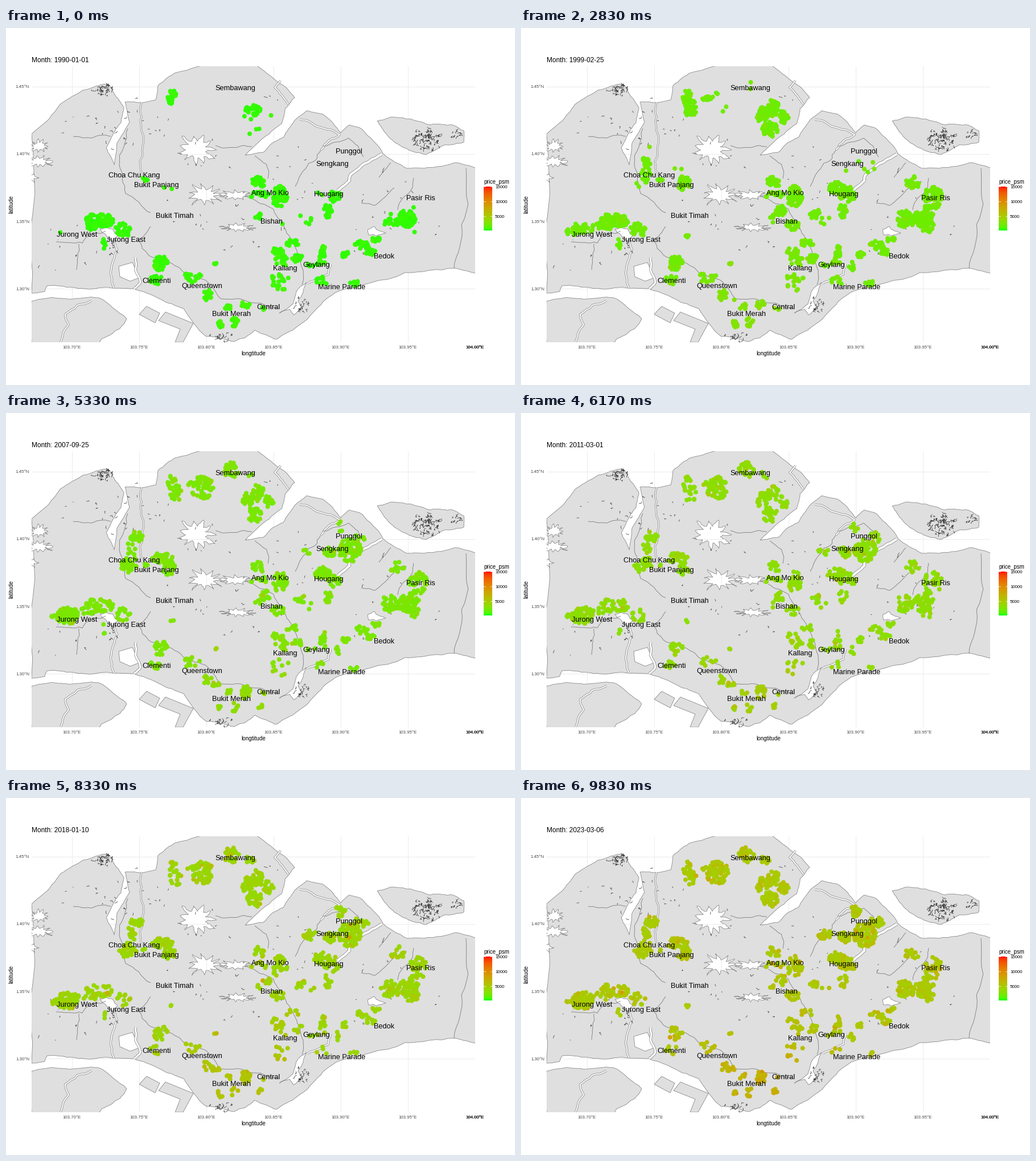
A matplotlib script that plays this animation: 894 by 626 pixels, repeating every 10 s.

```python
import numpy as np
import matplotlib.pyplot as plt
from matplotlib.animation import FuncAnimation
from matplotlib.collections import LineCollection
from matplotlib.patches import Polygon, Rectangle

W, H, DPI = 894, 626, 100
FRAMES, LOOP = 60, 10000
PX = 72 / DPI
LAND, COAST, GRID = "#dfdfdf", "#858585", "#ebebeb"
rng = np.random.default_rng(7)

plt.rcParams["font.family"] = "Liberation Sans"
fig = plt.figure(figsize=(W / DPI, H / DPI), dpi=DPI, facecolor="white")
ax = fig.add_axes([0, 0, 1, 1])
ax.axis("off")
panel = Rectangle((45, 67), 779, 484, fc="none", ec="none")
ax.add_patch(panel)

GRID_X = 116 + 118 * np.arange(7)
GRID_Y = 102.5 + 118.1 * np.arange(4)
GRID_LINES = [[(x, 67), (x, 551)] for x in GRID_X]
GRID_LINES += [[(45, y), (824, y)] for y in GRID_Y]


def rough(pts, amount, levels=3):
    """Split every edge at a midpoint pushed sideways, a few times over."""
    p = np.array(pts, float)
    for _ in range(levels):
        d = np.diff(p, axis=0)
        push = rng.normal(0, amount, (len(d), 1)) * np.c_[-d[:, 1], d[:, 0]]
        q = np.empty((2 * len(p) - 1, 2))
        q[::2], q[1::2] = p, p[:-1] + d / 2 + push
        p = q
    return p


def lines(segs, color, px, clip=panel):
    lc = LineCollection(segs, colors=color, linewidths=px * PX, zorder=1)
    ax.add_collection(lc, autolim=False)
    lc.set_clip_path(clip)


def area(pts, fill=LAND, amount=0.0):
    pts = rough(list(pts) + [pts[0]], amount)
    patch = Polygon(pts, fc=fill, ec=COAST, lw=0.8 * PX, zorder=1)
    ax.add_patch(patch)
    patch.set_clip_path(panel)
    if fill == "white":
        lines(GRID_LINES, GRID, 1, patch)


def lake(x, y, rx, ry, arms=11):
    """A reservoir with many narrow arms."""
    a = np.linspace(0, 2 * np.pi, 2 * arms, endpoint=False)
    a += rng.uniform(-0.1, 0.1, len(a))
    r = np.where(np.arange(len(a)) % 2, 0.5, 1) * rng.uniform(0.8, 1.1, len(a))
    area(np.c_[x + rx * r * np.cos(a), y + ry * r * np.sin(a)], "white", 0.08)


def canal(width, *pts):
    path = rough(pts, 0.05)
    lines([path], COAST, width + 1.5)
    lines([path], "white", width)


def stream(*pts):
    lines([rough(pts, 0.06)], "#777777", 0.8)


def scribble(x, y, rx, ry, n, steps=5):
    """Short random walks inside an ellipse, like tangled contour lines."""
    a, r = rng.uniform(0, 2 * np.pi, n), np.sqrt(rng.random(n))
    start = np.c_[x + rx * r * np.cos(a), y + ry * r * np.sin(a)]
    walk = np.cumsum(rng.normal(0, 1.7, (n, steps, 2)), axis=1)
    lines(start[:, None] + walk, "#333333", 0.7)


def label(x, y, s, px, ha="center", color="black"):
    return ax.text(x, y + 0.36 * px, s, fontsize=px * PX, ha=ha,
                   va="baseline", color=color, zorder=4)


# ---- map ----
lines(GRID_LINES, GRID, 1)

north_west = [
    (45, 186), (75, 160), (97, 132), (135, 109), (180, 98), (193, 120),
    (207, 140), (202, 166), (186, 190), (176, 210), (190, 240), (195, 202),
    (217, 165), (209, 130), (240, 131), (263, 126), (267, 101), (300, 78), (350, 66)]
north_east = [
    (425, 60), (478, 95), (507, 122), (490, 142), (484, 168), (448, 196),
    (420, 223), (452, 218), (487, 192), (507, 162), (528, 145), (556, 151),
    (588, 184), (603, 170), (626, 178), (662, 220)]
south_east = [
    (704, 246), (735, 246), (757, 243), (790, 236), (830, 247), (830, 431),
    (788, 421), (700, 429), (640, 447), (580, 463), (545, 493), (496, 533),
    (475, 546), (437, 530)]
south_west = [
    (420, 543), (400, 550), (352, 541), (312, 492), (270, 475), (225, 457),
    (180, 455), (146, 458), (118, 455), (72, 452), (68, 462), (45, 465)]
area(north_west + north_east + south_east + south_west, amount=0.035)

# islands and port terminals
area([(652, 163), (690, 157), (745, 170), (785, 170), (804, 180), (804, 200),
      (770, 205), (738, 222), (692, 206), (662, 178)], amount=0.05)
area([(45, 479), (92, 474), (130, 474), (163, 473), (212, 510), (200, 527),
      (168, 545), (160, 560), (45, 560)], amount=0.04)
area([(234, 502), (247, 488), (270, 500), (262, 517)])
area([(268, 513), (280, 498), (329, 518), (311, 551), (297, 551), (306, 528)])

# reservoirs and basins
lake(335, 213, 37, 30)
lake(350, 293, 36, 21)
lake(405, 293, 34, 9)
lake(407, 350, 32, 8)
lake(58, 207, 20, 12)
lake(58, 234, 27, 11)
lake(45, 262, 12, 9, 6)
area([(636, 353), (647, 348), (667, 359), (650, 365), (637, 363)], "white", 0.08)
area([(165, 353), (186, 352), (196, 365), (187, 373)], "white", 0.08)
area([(198, 418), (222, 411), (234, 438), (218, 444), (200, 436)], "white")
area([(480, 500), (504, 484), (510, 462), (528, 446), (513, 479), (521, 493),
      (505, 503), (498, 493)], "white", 0.04)

# rivers
canal(2, (516, 160), (552, 174), (586, 187), (553, 214))
canal(4, (660, 221), (634, 236), (606, 256), (603, 268), (582, 285))
canal(1.5, (238, 130), (236, 165), (242, 200), (236, 245), (241, 264))
canal(2, (190, 372), (195, 388), (184, 428), (190, 456))
canal(2, (482, 92), (472, 104), (496, 134))
canal(2, (96, 551), (110, 520), (104, 502), (150, 478))
canal(2, (530, 448), (566, 432), (570, 414))
canal(3, (225, 457), (236, 446), (228, 402))

stream((214, 176), (199, 240), (210, 290), (254, 324))
stream((254, 348), (232, 372), (250, 398), (290, 412), (318, 432), (350, 442))
stream((350, 442), (378, 475), (415, 476), (478, 492))
stream((437, 224), (460, 264))
stream((434, 300), (470, 318), (492, 356), (508, 385), (522, 425), (520, 450))
stream((553, 214), (526, 247), (508, 278))
stream((716, 263), (714, 280), (688, 319))
stream((682, 280), (648, 311), (624, 307))
stream((118, 190), (150, 193), (184, 190))
stream((88, 375), (134, 377), (141, 367), (175, 356))
stream((128, 378), (124, 424))
stream((368, 206), (418, 206), (432, 208))
stream((556, 207), (602, 193), (628, 226))
stream((808, 246), (800, 345), (787, 422))
stream((676, 236), (655, 262))

# dark tangles and scattered specks
scribble(738, 194, 26, 18, 75)
scribble(792, 185, 10, 6, 10)
scribble(172, 108, 14, 8, 30)
scribble(520, 486, 13, 15, 18)
scribble(376, 540, 26, 6, 14)
scribble(188, 382, 8, 16, 10)
scribble(190, 170, 100, 50, 30, 3)
scribble(400, 250, 150, 150, 40, 3)
scribble(110, 390, 60, 50, 14, 3)
scribble(670, 330, 100, 80, 20, 3)

# ---- flats ----
# share of a group that sells at each key time, by the age of the estate
KEYS = [0, 7, 17, 32, 59]
AGE = {
    "old": [1, 0.9, 1, 0.55, 0.5],
    "1992": [0.05, 0.9, 1, 0.55, 0.75],
    "1997": [0, 0.05, 1, 0.45, 0.45],
    "2001": [0, 0, 0.06, 0.85, 1],
    "2015": [0, 0, 0, 0.15, 1],
}
groups = []


def flats(age, x, y, rx, ry, n):
    """Homes spread over an ellipse; n of them sell at the busiest time."""
    m = int(n * 1.25) + 1
    a, r = rng.uniform(0, 2 * np.pi, m), np.sqrt(rng.random(m))
    px, py = x + rx * r * np.cos(a), y + ry * r * np.sin(a)
    near = np.exp(-((px - 410) ** 2 + (py - 490) ** 2) / 110 ** 2)
    premium = 1 + 0.45 * near + rng.gamma(1.2, 0.13, m)
    groups.append((np.c_[px, py], premium, n * np.array(AGE[age])))


# north
flats("old", 292, 121, 8, 13, 22)
flats("1997", 297, 140, 12, 15, 36)
flats("1997", 328, 123, 11, 4, 14)
flats("2001", 345, 131, 19, 22, 75)
flats("2001", 396, 100, 14, 14, 32)
flats("2015", 429, 107, 8, 8, 14)
flats("old", 432, 145, 16, 9, 26)
flats("1992", 424, 153, 10, 13, 34)
flats("1992", 443, 140, 10, 15, 30)
flats("1992", 437, 178, 14, 13, 55)
flats("1992", 461, 156, 9, 11, 26)
flats("old", 243, 265, 7, 4, 5)
flats("1997", 219, 248, 9, 23, 40)
flats("2001", 229, 217, 11, 9, 26)
flats("2001", 214, 268, 15, 12, 32)
flats("1992", 286, 272, 11, 13, 34)
flats("2001", 275, 255, 18, 10, 36)

# centre
flats("old", 444, 270, 13, 9, 26)
flats("old", 447, 293, 19, 6, 18)
flats("old", 480, 295, 14, 18, 60)
flats("old", 441, 331, 7, 10, 7)
flats("1997", 457, 320, 11, 9, 22)
flats("1992", 477, 346, 12, 8, 24)
flats("1992", 516, 325, 9, 11, 17)
flats("old", 533, 338, 11, 8, 4)
flats("old", 577, 293, 10, 12, 18)
flats("1992", 572, 290, 16, 12, 20)
flats("old", 566, 321, 8, 13, 22)
flats("1992", 555, 282, 17, 12, 40)
flats("2015", 534, 240, 12, 9, 26)
flats("2001", 569, 244, 14, 9, 26)
flats("2001", 604, 240, 20, 22, 90)
flats("2015", 586, 199, 10, 9, 26)
flats("2015", 624, 218, 13, 9, 30)
flats("old", 500, 377, 16, 6, 14)
flats("old", 474, 391, 14, 5, 8)
flats("old", 484, 405, 11, 14, 28)
flats("old", 512, 404, 10, 8, 16)
flats("old", 481, 445, 17, 16, 18)

# east
flats("old", 680, 340, 14, 7, 18)
flats("1992", 674, 334, 16, 15, 46)
flats("old", 704, 334, 15, 15, 62)
flats("1992", 713, 335, 13, 25, 66)
flats("1997", 724, 297, 16, 20, 70)
flats("1997", 687, 271, 15, 11, 32)
flats("old", 650, 371, 9, 4, 14)
flats("old", 626, 381, 14, 8, 22)
flats("old", 640, 393, 10, 6, 16)
flats("old", 597, 398, 7, 6, 13)
flats("1992", 581, 418, 5, 9, 8)
flats("old", 612, 447, 8, 5, 9)
flats("old", 554, 444, 10, 9, 9)
flats("old", 556, 397, 7, 18, 28)
flats("old", 539, 414, 12, 5, 6)

# west
flats("old", 152, 341, 13, 14, 42)
flats("old", 172, 337, 19, 11, 46)
flats("old", 205, 355, 14, 13, 26)
flats("old", 171, 378, 5, 9, 6)
flats("1992", 89, 357, 9, 8, 14)
flats("2001", 108, 355, 20, 15, 70)
flats("1997", 104, 351, 15, 9, 30)
flats("1997", 133, 347, 8, 6, 9)

# south
flats("old", 272, 413, 13, 13, 42)
flats("old", 264, 442, 11, 9, 17)
flats("1992", 291, 365, 5, 2, 4)
flats("old", 328, 438, 18, 10, 20)
flats("old", 368, 415, 5, 3, 4)
flats("old", 354, 469, 8, 10, 13)
flats("2001", 368, 476, 10, 6, 10)
flats("old", 390, 488, 10, 5, 8)
flats("2001", 421, 491, 9, 12, 18)
flats("old", 419, 484, 9, 7, 9)
flats("old", 376, 519, 6, 6, 11)
flats("old", 402, 515, 6, 10, 12)
flats("old", 450, 493, 5, 6, 3)
flats("2001", 446, 514, 4, 5, 5)

# ---- colour scale: green to red through Lab ----
LOW, HIGH = 385, 15050
GREEN_LAB = np.array([87.73, -86.18, 83.18])
RED_LAB = np.array([53.24, 80.09, 67.20])
XYZ_RGB = np.array([[3.2406, -1.5372, -0.4986],
                    [-0.9689, 1.8758, 0.0415],
                    [0.0557, -0.2040, 1.0570]])


def price_color(price):
    t = np.clip((np.asarray(price, float) - LOW) / (HIGH - LOW), 0, 1)
    L, a, b = (GREEN_LAB + (RED_LAB - GREEN_LAB) * t[:, None]).T
    fy = (L + 16) / 116
    f = np.stack([fy + a / 500, fy, fy - b / 200])
    xyz = np.where(f > 6 / 29, f ** 3, 3 * (6 / 29) ** 2 * (f - 4 / 29))
    xyz *= np.array([[0.9505], [1.0], [1.089]])
    rgb = np.clip(XYZ_RGB @ xyz, 0, 1)
    return np.where(rgb > 0.0031308, 1.055 * rgb ** (1 / 2.4) - 0.055, 12.92 * rgb).T


bar = price_color(np.linspace(HIGH, LOW, 154))[:, None, :]
ax.imshow(bar, extent=(839, 854, 355, 278), aspect="auto", zorder=2)
ax.set(xlim=(0, W), ylim=(H, 0))
label(839, 269, "price_psm", 9.8, "left")
for i in range(3):
    y = 278.3 + 26 * i
    label(859, y, f"{15000 - 5000 * i}", 7.9, "left")
    for x in (839, 851):
        ax.plot([x, x + 3], [y, y], color="white", lw=0.7 * PX, zorder=3)

# ---- text ----
for i, x in enumerate(GRID_X):
    # the last meridian label is printed several times over
    for _ in range(6 if i == 6 else 1):
        label(x, 559, f"{103.7 + 0.05 * i:.2f}°E", 7.9, color="#4d4d4d")
for i, y in enumerate(GRID_Y):
    label(41, y, f"{1.45 - 0.05 * i:.2f}°N", 7.9, "right", "#4d4d4d")
label(434.5, 570, "longtitude", 9.9)
ax.text(9, 309, "latitude", fontsize=9.9 * PX, rotation=90, ha="center", va="center")

TOWNS = [
    ("Sembawang", 402.5, 104), ("Punggol", 602.5, 215), ("Sengkang", 573, 237.5),
    ("Choa Chu Kang", 225, 257), ("Bukit Panjang", 264.5, 274),
    ("Ang Mo Kio", 464, 288.5), ("Hougang", 567, 290), ("Pasir Ris", 728.5, 297),
    ("Bukit Timah", 296, 328.5), ("Bishan", 466.5, 338.5),
    ("Jurong West", 125, 361), ("Jurong East", 211, 370), ("Bedok", 664, 399),
    ("Kallang", 490, 420), ("Geylang", 545, 414.5), ("Clementi", 265, 442),
    ("Queenstown", 344, 451), ("Marine Parade", 590, 453),
    ("Central", 461, 488), ("Bukit Merah", 395.5, 500)]
for name, x, y in TOWNS:
    label(x, y, name, 12.7)
title = label(45, 56, "", 11.9, "left")

dots = ax.scatter([], [], s=(8 * PX) ** 2, linewidths=0, zorder=3)
START = np.datetime64("1990-01-01")
DAYS = 12326


def draw(k):
    pick = np.random.default_rng(1000 + k)
    base = np.interp(k, [0, 7, 17, 32, 42, 50, 59],
                     [650, 1250, 2000, 2350, 3800, 3700, 4800])
    activity = np.interp(k, [0, 32, 42, 50, 59], [1, 1, 0.75, 0.9, 1])
    pos, price = [], []
    for sites, premium, sales in groups:
        n = int(round(np.interp(k, KEYS, sales) * activity))
        chosen = pick.permutation(len(sites))[:n]
        pos.append(sites[chosen])
        price.append(base * premium[chosen])
    dots.set_offsets(np.concatenate(pos))
    dots.set_facecolor(price_color(np.concatenate(price)))
    title.set_text(f"Month: {START + DAYS * k // (FRAMES - 1)}")
    return dots, title


anim = FuncAnimation(fig, draw, frames=FRAMES, interval=LOOP / FRAMES,
                     repeat=True, repeat_delay=0)
plt.show()
```
